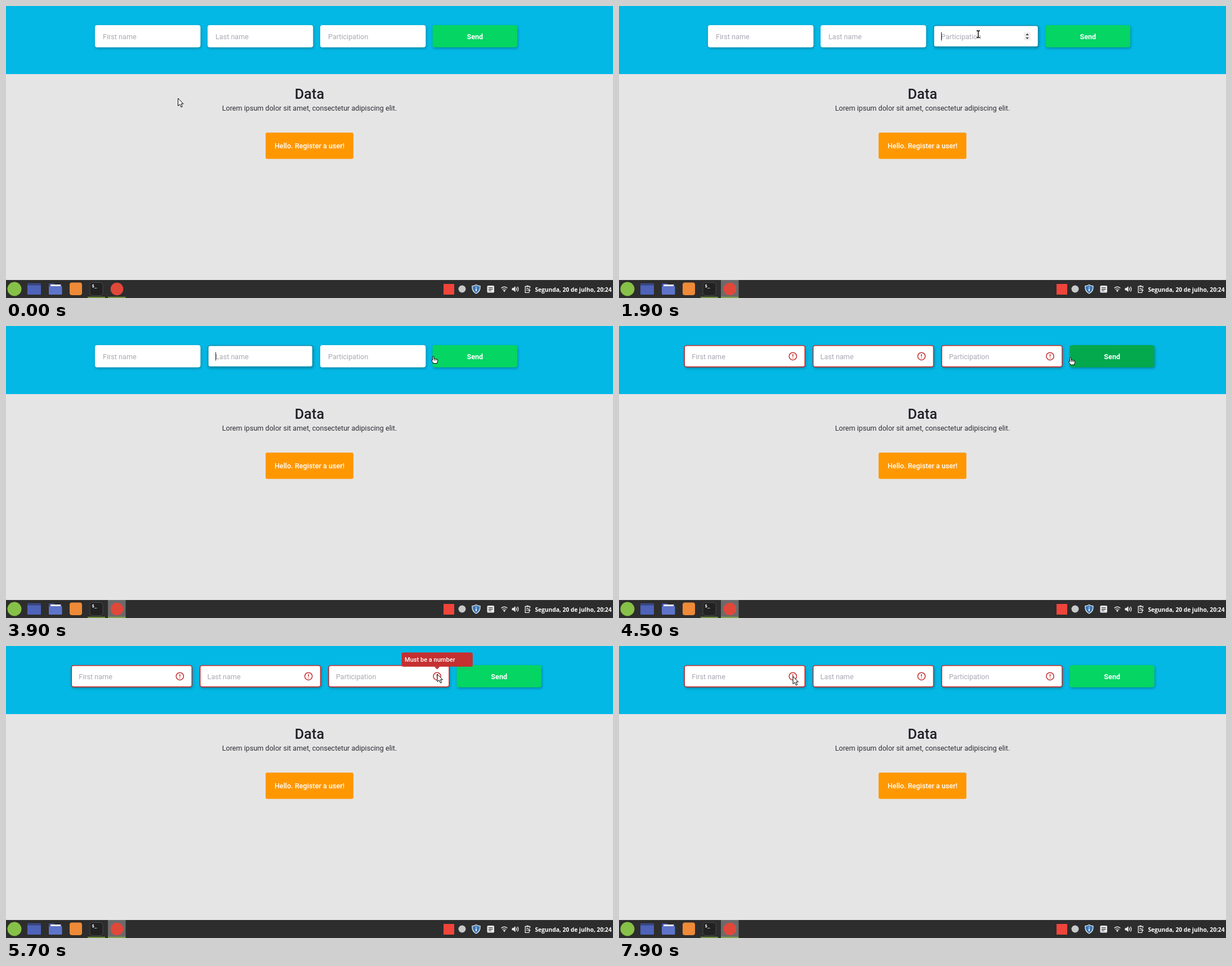
An HTML page for the animation above (8 s loop, 1078 by 519 pixels).

```html
<!DOCTYPE html>
<html lang="en">
<head>
<meta charset="utf-8">
<title>Registration form</title>
<style>
  html, body { margin: 0; width: 100%; height: 100%; overflow: hidden; background: #e5e5e5; }
  svg { display: block; width: 1078px; height: 519px; }
  text { font: 12.627px Roboto, sans-serif; }
  .mid { text-anchor: middle; }
  .medium { font-weight: 500; }
  .white { fill: #fff; }
  .shadow { filter: drop-shadow(1px 2px 2px rgba(0, 0, 0, .28)); }
  .hint { fill: #a8a8b3; }
  .tip { font-size: 11.05px; }
  .clock { font: 700 10.2px "Open Sans", sans-serif; text-anchor: end; fill: #fff; }
  .line { fill: none; stroke: #e8e8e8; stroke-width: 1.3; }
  .alert { fill: none; stroke: #c53030; stroke-width: 1.5; stroke-linecap: round; }
  .pointer { fill: #fff; stroke: #000; stroke-width: 1; stroke-linejoin: round; }
</style>
</head>
<body>
<svg viewBox="0 0 1078 519">
  <rect width="1078" height="519" fill="#e5e5e5"/>
  <rect width="1078" height="121" fill="#03b8e5"/>

  <g id="fields"></g>
  <g id="send">
    <rect id="sendBox" class="shadow" y="34" width="150.5" height="39.4" rx="4"/>
    <text class="mid white" x="75.3" y="58.5" style="font-weight:700">Send</text>
  </g>
  <g id="tip">
    <path d="M-5 36.5H5L0 41.5Z" fill="#c53030"/>
    <rect x="-63" y="11.5" width="126.3" height="25.3" rx="3" fill="#c53030"/>
    <text id="tipText" class="tip medium white" x="-57.6" y="27.6"></text>
  </g>

  <text class="mid medium" x="539" y="164.8" fill="#1f1f28" style="font-size:25.25px">Data</text>
  <text class="mid" x="539" y="186.4" fill="#312e38">Lorem ipsum dolor sit amet, consectetur adipiscing elit.</text>
  <rect x="461" y="225" width="156" height="46.7" rx="3" fill="#ff9800"/>
  <text class="mid medium white" x="539" y="252.8">Hello. Register a user!</text>

  <!-- taskbar -->
  <rect y="487" width="1078" height="32" fill="#2d2d2d"/>
  <rect id="active" x="181" y="487" width="31.5" height="32" fill="#6b6b6b"/>
  <path d="M145 517.7h31M181 517.7h31.5" stroke="#87b644" stroke-width="1.6"/>
  <circle cx="15" cy="503" r="12.5" fill="#87c147"/>
  <rect x="38" y="493" width="24" height="20" rx="1" fill="#4e63b9"/>
  <path d="M38 495h24" stroke="#34437f" stroke-width="3"/>
  <path d="M76 512V494q0-1 1-1h8l2 2h11q1 0 1 1v16Z" fill="#3d509e"/>
  <rect x="79" y="495" width="18" height="8" fill="#f2f2f2"/>
  <rect x="76" y="498" width="23.5" height="15" rx="1.5" fill="#5e74cb"/>
  <rect x="113" y="491.5" width="22" height="22.5" rx="4" fill="#ee8a38"/>
  <rect x="149" y="491.5" width="23" height="23" rx="4" fill="#222" stroke="#484848"/>
  <text x="152.5" y="500" class="white" style="font:700 7.5px 'DejaVu Sans Mono',monospace">$_</text>
  <circle cx="197" cy="503" r="11.3" fill="#e0483a"/>

  <!-- tray -->
  <rect x="777" y="494" width="19" height="19" fill="#ef443b"/>
  <circle cx="810" cy="503" r="6.5" fill="#c9c9c9"/>
  <path d="M835 495.5q3.5 2.3 7 2.2q.8 9.3-7 13.3q-7.800-4-7-13.300q3.500.1 7-2.200Z" fill="#3c78b8" stroke="#e4e4e4" stroke-width="1.300"/>
  <path d="M835 499v1.600M835 502v5" stroke="#fff" stroke-width="1.700"/>
  <rect x="854.500" y="497" width="12.500" height="12.500" rx="1.800" fill="#e8e8e8"/>
  <path d="M857 500.500h7.500M857 503.300h7.500M857 506h5" stroke="#2d2d2d" stroke-width="1.200"/>
  <path class="line" d="M879.500 501.500q5.500-4.500 11 0M881.500 504q3.500-2.700 7 0"/>
  <path d="M882.800 505.500q2.200-1.500 4.400 0L885 508.500Z" fill="#e8e8e8"/>
  <path d="M898.500 501.300h2.500l3.500-3.300v10.600l-3.500-3.300h-2.500Z" fill="#e8e8e8"/>
  <path class="line" d="M906 500.700q2 2.600 0 5.200M908.200 499q3.400 4.300 0 8.600"/>
  <path class="line" d="M929.500 509.300h-7.300V498.500h8.300v3M924.500 497.500h3.500M924.300 502h3.500M924.300 505h2"/>
  <path d="M930 501l-3.500 4.700h2.500l-1 4 4-5.200h-2.500Z" fill="#e8e8e8"/>
  <text class="clock" x="1075.5" y="507.6">Segunda, 20 de julho, 20:24</text>

  <g id="cursor">
    <path id="arrow" class="pointer" d="M0 0V13.500L3.200 10.700L5.500 15.800L7.700 14.800L5.500 9.900H9.500Z"/>
    <g id="beam" fill="none">
      <path d="M-3 -6H-1L0 -5L1 -6H3M0 -5V5M-3 6H-1L0 5L1 6H3" stroke="#fff" stroke-width="3"/>
      <path d="M-3 -6H-1L0 -5L1 -6H3M0 -5V5M-3 6H-1L0 5L1 6H3" stroke="#000" stroke-width="1.400"/>
    </g>
    <g id="hand">
      <path class="pointer" d="M-3.500 1V-5q0-1.300 1.200-1.300T-1.100-5V-1.700Q0-2.700 1.200-1.500Q2.300-2.200 3.300-1Q5.800-1.500 5.800.8Q5.800 3.800 4.600 5.200V6.500H-2.500V5.300L-5.700 1.200Q-5-.6-3.500 1Z"/>
      <path d="M-1 -1.500V1.500M1.200 -1V1.500M3.400 -.6V1.500" stroke="#000" stroke-width=".8"/>
    </g>
  </g>
</svg>

<script>
const LOOP = 8000;
const $ = id => document.getElementById(id);
const show = (el, on) => { el.style.display = on ? '' : 'none'; };
const moveTo = (el, x, y = 0) => el.setAttribute('transform', `translate(${x} ${y})`);
const setAll = (el, attrs) => Object.entries(attrs).forEach(([k, v]) => el.setAttribute(k, v));

const fields = ['First name', 'Last name', 'Participation'].map(label => {
  const g = document.createElementNS('http://www.w3.org/2000/svg', 'g');
  g.innerHTML = `
    <rect class="shadow box" fill="#fff"/>
    <text class="hint" y="58.5">${label}</text>
    <path class="caret" d="M14.500 46.500V61.500" stroke="#222" stroke-width="1"/>
    <g class="spin">
      <rect x="161" y="46.500" width="12" height="14.500" fill="#efefef"/>
      <path d="M164 52L167 48.700L170 52ZM164 55.800L167 59.100L170 55.800Z" fill="#4a4a4a"/>
    </g>
    <g class="alert" transform="translate(193.300 53.800)">
      <circle r="6.600"/><path d="M0-3.200V.3M0 3V3.100"/>
    </g>`;
  $('fields').append(g);
  const part = name => g.querySelector(name);
  return { g, box: part('.box'), text: part('text'), caret: part('.caret'), spin: part('.spin'), alert: part('.alert') };
});

// Pointer poses: time, x, y, shape
const pointer = [
  [0, 305.5, 164, 'arrow'],
  [600, 350, 159, 'arrow'], [700, 440, 149, 'arrow'], [800, 545, 137, 'arrow'], [900, 597, 131, 'arrow'],
  [1200, 606, 122, 'arrow'], [1300, 616, 105, 'arrow'], [1400, 626, 82, 'arrow'],
  [1500, 634, 60, 'beam'], [1600, 638, 50, 'beam'],
  [2200, 600, 53, 'beam'], [2300, 515, 60, 'beam'], [2400, 468, 63, 'beam'],
  [3400, 495, 63, 'beam'], [3500, 580, 62, 'beam'], [3600, 665, 61, 'beam'],
  [3700, 720, 60, 'beam'], [3900, 761, 60, 'hand'],
  [4100, 790, 62, 'hand'], [4300, 804, 62.5, 'hand'], [4800, 804, 63.3, 'hand'],
  [5100, 786, 55, 'arrow'], [5300, 766, 50, 'arrow'],
  [6200, 730, 54, 'beam'], [6400, 600, 54, 'beam'], [6600, 542, 51, 'arrow'], [6800, 538, 51, 'arrow'],
  [7400, 470, 54, 'beam'], [7600, 345, 55, 'arrow'], [7900, 309, 54, 'arrow']
];
// Focused field: time, index
const focus = [[0, -1], [1800, 2], [2900, 1], [4300, -1]];
// Tooltip: time, field index, opacity
const tips = [
  [0, 2, 0], [5500, 2, .5], [5700, 2, 1], [6200, 2, .5], [6400, 2, 0],
  [6800, 1, .5], [7000, 1, 1], [7400, 1, .5], [7600, 1, 0]
];
const latest = (steps, t) => steps.findLast(step => step[0] <= t);

function drawField(f, i, invalid, focused, hovered) {
  moveTo(f.g, invalid ? 115.5 + 228.4 * i : 158 + 200 * i);
  const edge = invalid || focused ? .8 : 0;
  setAll(f.box, {
    x: edge, y: 34 + edge, rx: 4 - edge / 2,
    width: (invalid ? 215.5 : 187.4) - 2 * edge, height: 39.4 - 2 * edge,
    stroke: invalid ? '#c53030' : focused ? '#078fb3' : 'none', 'stroke-width': 1.6
  });
  f.text.setAttribute('x', invalid ? 13.7 : 14);
  show(f.caret, focused);
  show(f.spin, i === 2 && !invalid && (focused || hovered));
  show(f.alert, invalid);
}

function draw(t) {
  const [, x, y, shape] = latest(pointer, t);
  const [, focused] = latest(focus, t);
  const [, tipField, opacity] = latest(tips, t);
  const invalid = t >= 4300;

  fields.forEach((f, i) => drawField(f, i, invalid, i === focused, shape === 'beam' && x > 558));
  moveTo($('send'), invalid ? 800.4 : 757.5);
  $('sendBox').setAttribute('fill', t >= 4100 && t < 5100 ? '#04a84d' : '#05d563');
  show($('active'), t >= 1800);

  moveTo($('tip'), 308.8 + 228.4 * tipField);
  $('tip').style.opacity = opacity;
  $('tipText').textContent = tipField === 2 ? 'Must be a number' : 'Required field';

  moveTo($('cursor'), x, y);
  ['arrow', 'beam', 'hand'].forEach(id => show($(id), id === shape));
}

const start = performance.now();
function tick() {
  draw((performance.now() - start) % LOOP);
  requestAnimationFrame(tick);
}
tick();
</script>
</body>
</html>
```
